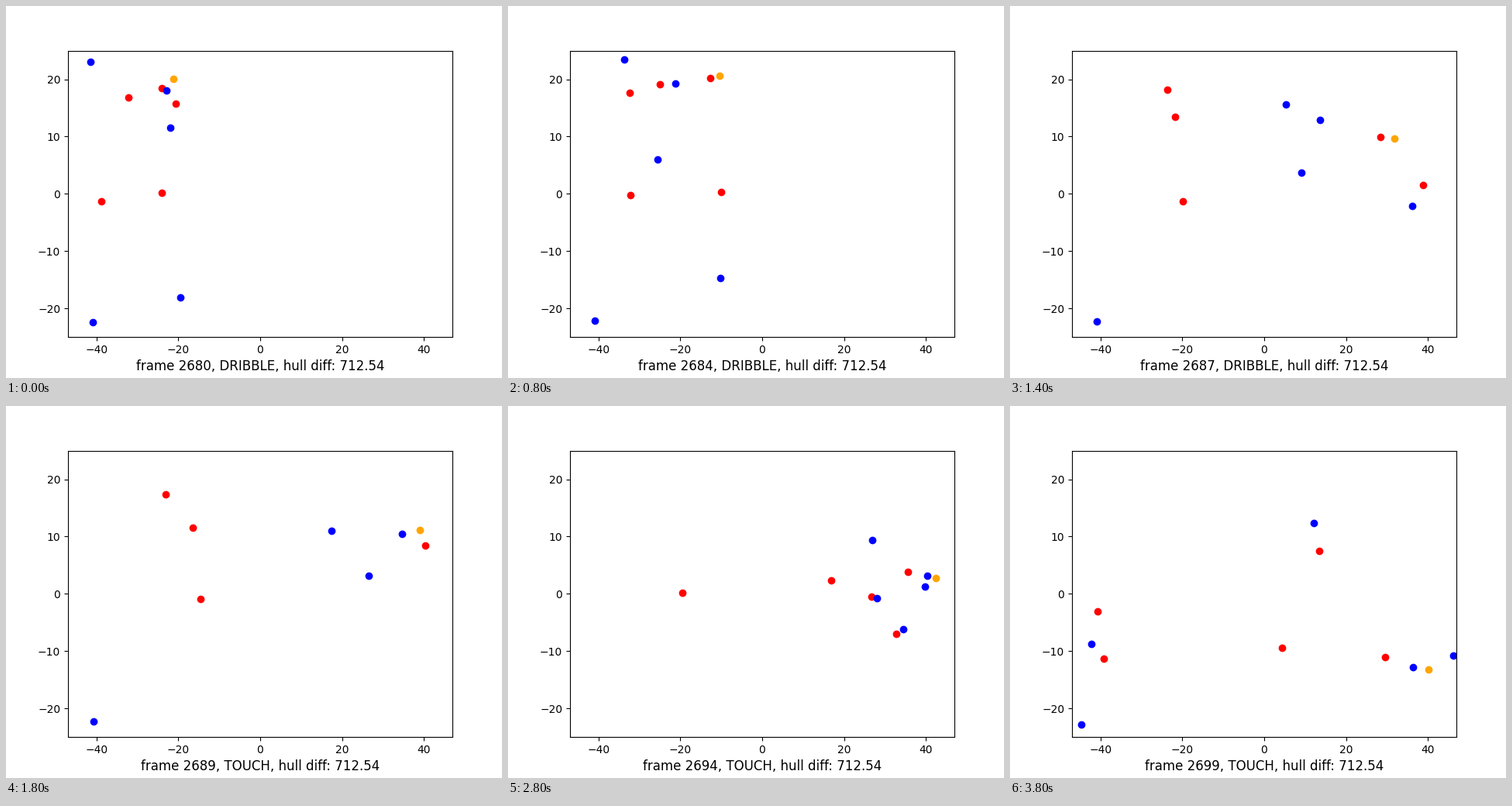
Write a matplotlib script that moves like this. It is 640 px wide and 480 px high and loops after 4000 ms.

```python
import numpy as np
import matplotlib.pyplot as plt
from matplotlib.animation import FuncAnimation
from matplotlib.transforms import IdentityTransform

STEPS = 20
FIRST = 2680
HEIGHT = 480
HULL_DIFF = 712.54
EVENTS = ("DRIBBLE PASS TOUCH DRIBBLE DRIBBLE PASS TOUCH DRIBBLE PASS TOUCH "
          "SHOT FOUL PASS PASS TOUCH PASS TOUCH TOUCH PASS TOUCH").split()
# A received pass repeats the positions of the step before it.
HOLD = {2: 1, 9: 8}

# Everyone runs straight between way points reached at these steps.
KEYS = np.array([0, 4, 6, 8, 11, 14, 19])

REDS = [
    [(201, 106), (196, 101), (200, 102), (206, 114), (426, 100), (469, 246), (351, 312)],
    [(158, 118), (157, 112), (185, 128), (241, 157), (225, 163), (225, 241), (113, 265)],
    [(219, 126), (261, 93), (415, 158), (541, 180), (524, 154), (516, 214), (399, 187)],
    [(201, 241), (275, 240), (456, 202), (610, 260), (533, 328), (501, 294), (484, 324)],
    [(123, 252), (158, 244), (195, 254), (251, 249), (328, 229), (417, 225), (121, 326)],
]
BLUES = [
    [(109, 72), (150, 69), (291, 92), (420, 161), (534, 172), (470, 173), (392, 151)],
    [(207, 109), (216, 100), (289, 129), (511, 165), (554, 182), (541, 219), (572, 322)],
    [(212, 157), (193, 198), (284, 210), (468, 219), (513, 199), (476, 248), (105, 307)],
    [(225, 376), (274, 351), (437, 266), (600, 250), (541, 221), (538, 233), (520, 337)],
    [(112, 408), (112, 406), (110, 406), (113, 407), (215, 381), (510, 288), (92, 411)],
]
BALL = [
    [(216, 94), (273, 90), (457, 182), (534, 160), (521, 148), (552, 222), (540, 340)],
]

fig, ax = plt.subplots(figsize=(6.4, HEIGHT / 100), dpi=100)
ax.set_xlim(-47, 47)
ax.set_ylim(-25, 25)
label = ax.set_xlabel("", fontsize=12)


def make_dots(color):
    return ax.plot([], [], "o", color=color, transform=IdentityTransform())[0]


groups = [(np.array(paths, float), make_dots(color))
          for paths, color in ((REDS, "red"), (BLUES, "blue"), (BALL, "orange"))]


def positions(paths, step):
    """Stage pixels of every path at a step, y counted from the top."""
    k = min(np.searchsorted(KEYS, step, side="right"), len(KEYS) - 1)
    part = (step - KEYS[k - 1]) / (KEYS[k] - KEYS[k - 1])
    return ((1 - part) * paths[:, k - 1] + part * paths[:, k]).T


def update(step):
    for paths, dots in groups:
        x, y = positions(paths, HOLD.get(step, step))
        dots.set_data(x, HEIGHT - y)
    label.set_text(f"frame {FIRST + step}, {EVENTS[step]}, hull diff: {HULL_DIFF}")
    return [dots for _, dots in groups] + [label]


anim = FuncAnimation(fig, update, frames=STEPS, interval=1000 * 4 / STEPS, repeat=True)
plt.show()
```
